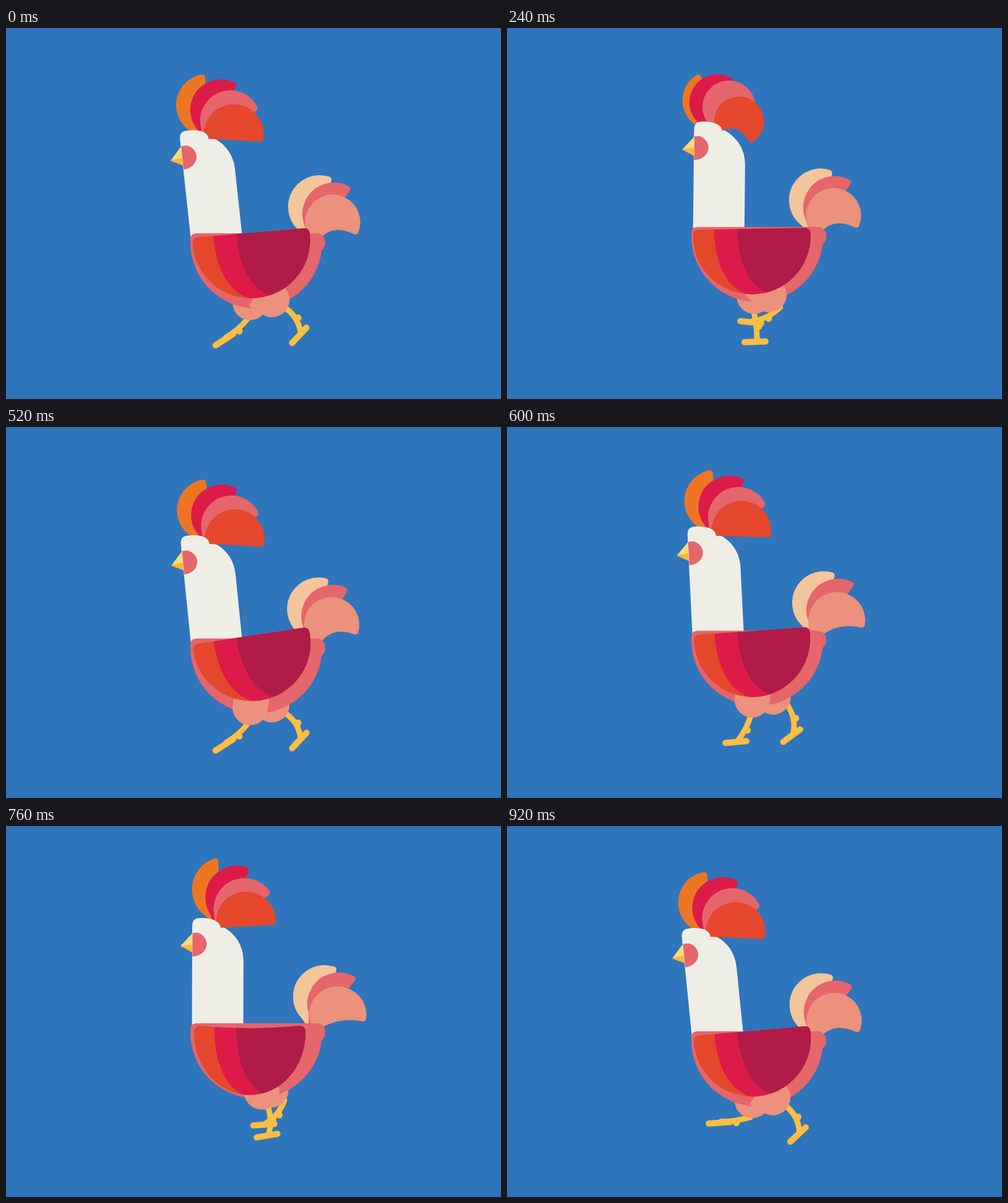
An HTML page with a canvas that plays this animation: 800 px wide and 600 px high, repeating every 0.96 s.

```html
<!DOCTYPE html>
<html lang="en">
<head>
<meta charset="utf-8">
<title>Strutting hen</title>
<style>
  html, body { margin: 0; width: 100%; height: 100%; overflow: hidden; background: #2f75bb; }
  canvas { display: block; width: 800px; height: 600px; }
</style>
</head>
<body>
<canvas id="stage" width="800" height="600"></canvas>
<script>
const ctx = document.getElementById('stage').getContext('2d');
const LOOP = 960, STEP = 40, RAD = Math.PI / 180;
const { sin, cos, PI } = Math;
const C = {
  sky: '#2f75bb', rose: '#e5666b', salmon: '#eb917c', red: '#e4472c', crimson: '#dc1b49',
  maroon: '#b01b48', white: '#efeee6', orange: '#ed7625', cream: '#f3c59b',
  yellow: '#fdbe41', beak: '#fcd97c', beakDark: '#fbb63f'
};

// One stride: thigh angle, foot x, foot y below the back, foot angle.
const STRIDE = [
  [58, 474, 165, -47],  // push off
  [58, 437, 173, -20],  // lift
  [42, 394, 154, 6],    // swing
  [-6, 343, 148, -4],   // reach
  [-9, 353, 172, -33],  // land
  [-6, 370, 180, -5],   // plant
  [-3, 398, 186, -1],   // stand
  [50, 446, 175, -23]   // trail
];
const NEAR = { start: 0, times: [0, 120, 240, 360, 520, 600, 690, 835] };
const FAR = { start: 520, times: [0, 160, 310, 400, 440, 520, 670, 810] };

// Periodic cubic through the stride poses.
function stride({ start, times }, now) {
  const n = times.length, t = (now - start + LOOP) % LOOP;
  const time = i => times[(i + n) % n] + Math.floor(i / n) * LOOP;
  const pose = i => STRIDE[(i + n) % n];
  const i = times.filter(v => v <= t).length - 1;
  const t0 = time(i), t1 = time(i + 1), h = t1 - t0, u = (t - t0) / h;
  return STRIDE[0].map((_, k) => {
    const a = pose(i)[k], b = pose(i + 1)[k], d = b - a;
    const m0 = (b - pose(i - 1)[k]) / (t1 - time(i - 1)) * h;
    const m1 = (pose(i + 2)[k] - a) / (time(i + 2) - t0) * h;
    return a + u * (m0 + u * (3 * d - 2 * m0 - m1 + u * (m0 + m1 - 2 * d)));
  });
}

// Smooth bump around one angle of the cycle, between two levels of the cosine.
function pulse(q, center, low, high) {
  const x = Math.min(1, Math.max(0, (cos(q - center * RAD) - low) / (high - low)));
  return x * x * (3 - 2 * x);
}

function fill(color, draw) {
  ctx.beginPath();
  draw();
  ctx.closePath();
  ctx.fillStyle = color;
  ctx.fill();
}

function poly(color, ...pts) {
  fill(color, () => pts.forEach(p => ctx.lineTo(...p)));
}

function placed(x, y, angle, draw) {
  ctx.save();
  ctx.translate(x, y);
  ctx.rotate(angle);
  draw();
  ctx.restore();
}

// A half disc hanging on its base, with a tip rounded by the outline.
function feather(color, bx, by, x, y, r, tip, hollow) {
  const edge = 5, R = r - edge, end = tip * RAD;
  const start = Math.atan2(by - y, bx - x) + .4;
  const mx = (bx + x + R * cos(end)) / 2, my = (by + y + R * sin(end)) / 2;
  fill(color, () => {
    ctx.moveTo(bx, by);
    ctx.arc(x, y, R, start, end);
    ctx.quadraticCurveTo(mx + hollow * (x - mx), my + hollow * (y - my), bx, by);
  });
  ctx.strokeStyle = color;
  ctx.lineWidth = edge * 2;
  ctx.stroke();
}

function leg(top, [angle, fx, drop, footAngle]) {
  const a = angle * RAD, f = footAngle * RAD, fy = top + drop;
  const x = 400 + 35 * sin(a), y = top + 102 + 10 * cos(a);
  const sx = x + 27 * sin(a), sy = y + 27 * cos(a);
  const ex = fx + 3 * cos(f), ey = fy + 3 * sin(f) - 2;
  const len = Math.hypot(ex - sx, ey - sy);
  const nx = (ey - sy) / len, ny = (sx - ex) / len;
  const mx = (sx + ex) / 2, my = (sy + ey) / 2;
  const bend = 3 + 8 * Math.abs(sin(a)), knee = bend / 2 + 4;
  ctx.strokeStyle = C.yellow;
  ctx.lineWidth = 9;
  ctx.beginPath();
  ctx.moveTo(sx, sy);
  ctx.quadraticCurveTo(mx + nx * bend, my + ny * bend, ex, ey);
  ctx.stroke();
  fill(C.yellow, () => ctx.arc(mx + nx * knee, my + ny * knee, 5.5, 0, 7));
  ctx.lineWidth = 10;
  placed(fx, fy, f, () => {
    ctx.beginPath();
    ctx.moveTo(-17, 0);
    ctx.lineTo(17, 0);
    ctx.stroke();
  });
  placed(x, y, -a, () => fill(C.salmon, () => {
    ctx.moveTo(-28.5, -26);
    ctx.lineTo(28.5, -26);
    ctx.arc(0, 0, 28.5, 0, PI);
  }));
}

function tail(top, lift, droop) {
  const dx = 8 * lift - 2.5 * droop, y = top - 5 * droop, sag = 5 * droop;
  feather(C.cream, 494, top + 6, 507 + dx, y - 43, 51, -72 - sag, 0);
  feather(C.rose, 494, top + 6, 530 + dx, y - 31, 51, -62 - sag, 0);
  feather(C.salmon, 503, top + 6, 528 + dx, y - 18 + 5 * lift, 44.5 + 2 * lift, 22 - sag - 15 * lift, 1.2);
}

// Four feathers fanned around one base.
function crest(bx, by, curl, spread) {
  [C.orange, C.crimson, C.rose, C.red].forEach((color, i) => {
    const turn = -87 + 28 * i - curl * (18 + 9 * i * (3 - i)) + spread * (8 - 4 * i);
    const dist = 49.5 - 1.2 * i - curl * (2 + 3.5 * i) + spread * (9 - 3 * i);
    const r = 50 - .6 * i - curl * (2 + 2 * i) + spread * (3 - i);
    const tip = -100 + 36.5 * i + curl * (23 * i - 22) - 9 * spread;
    const hollow = Math.min(1.2, Math.max(0, (tip - 10) / 25));
    feather(color, bx, by, bx + dist * cos(turn * RAD), by + dist * sin(turn * RAD), r, tip, hollow);
  });
}

function head(top, lean, curl, spread) {
  const px = 342 + .4 * lean, a = lean * RAD;
  placed(px, top, a, () => {
    poly(C.beak, [-40, -147], [-60.5, -124.5], [-40, -127]);
    poly(C.beakDark, [-60.5, -124.5], [-40, -128], [-40, -114]);
    fill(C.white, () => {
      ctx.moveTo(-41.5, 6);
      ctx.lineTo(-41.5, -150);
      ctx.lineTo(0, -160);
      ctx.bezierCurveTo(24, -150, 41.5, -130, 41.5, -100);
      ctx.lineTo(41.5, 6);
    });
    fill(C.rose, () => ctx.ellipse(-41, -128, 23, 20, 0, -PI / 2, PI / 2));
  });
  crest(px + 159 * sin(a), top - 159 * cos(a), curl, spread);
  placed(px, top, a, () => fill(C.white, () => {
    ctx.moveTo(-41.5, -146);
    ctx.lineTo(-41.5, -157);
    ctx.quadraticCurveTo(-41.5, -170, -30, -170);
    ctx.bezierCurveTo(-18, -171, 4, -168, 4.5, -154);
    ctx.lineTo(0, -148);
  }));
}

function bowl(top) {
  fill(C.rose, () => {
    ctx.moveTo(298, top + 10);
    ctx.quadraticCurveTo(298, top, 308, top);
    ctx.lineTo(501, top);
    ctx.quadraticCurveTo(511, top, 511, top + 10);
    ctx.arc(404.5, top + 15, 106.5, 0, PI);
  });
  fill(C.rose, () => ctx.roundRect(470, top, 46, 30, 14));
}

// The wing hangs on a steady shoulder while its front edge follows the body.
function wing(top, flap) {
  const w = 95 - 5 * flap, depth = 106 + 6 * flap, sag = 4 * flap;
  const tilt = 1.25 * (top - 319);
  placed(395.5 - 1.5 * flap, 323 + tilt / 2, Math.atan2(-tilt, 2 * w), () => {
    fill(C.red, () => {
      ctx.moveTo(-w, 10);
      ctx.quadraticCurveTo(-w, 0, 10 - w, 0);
      ctx.quadraticCurveTo(0, 2 * sag, w - 10, 0);
      ctx.quadraticCurveTo(w, 0, w, 10);
      ctx.ellipse(0, 12, w, depth - 12, 0, 0, PI);
    });
    ctx.clip();
    const stripe = (color, from, to) => fill(color, () => {
      ctx.moveTo(from * w, 0);
      ctx.bezierCurveTo(from * w, .55 * depth, (to - .35) * w, .9 * depth, to * w, depth + 1);
      ctx.lineTo(w, depth + 1);
      ctx.lineTo(w, 0);
    });
    stripe(C.crimson, -.64, -.08);
    stripe(C.maroon, -.245, .31);
  });
}

function draw(t) {
  const q = 2 * PI * t / LOOP;
  const top = 329.3 - 6.8 * cos(q) + 2 * sin(q) + 9.5 * cos(2 * q) - 3.2 * sin(2 * q);
  const lean = -2.8 - 3.4 * cos(2 * q);
  const flap = pulse(q, 283, .4, .85);
  ctx.fillStyle = C.sky;
  ctx.fillRect(0, 0, 800, 600);
  tail(top, pulse(q, 270, .1, 1), pulse(q, 165, .1, 1));
  head(top, lean, pulse(q, 90, .3, 1), flap);
  leg(top, stride(FAR, t));
  bowl(top);
  leg(top, stride(NEAR, t));
  wing(top, flap);
}

function tick() {
  draw(Math.floor(performance.now() / STEP) * STEP % LOOP);
  requestAnimationFrame(tick);
}

ctx.lineCap = ctx.lineJoin = 'round';
tick();
</script>
</body>
</html>
```
